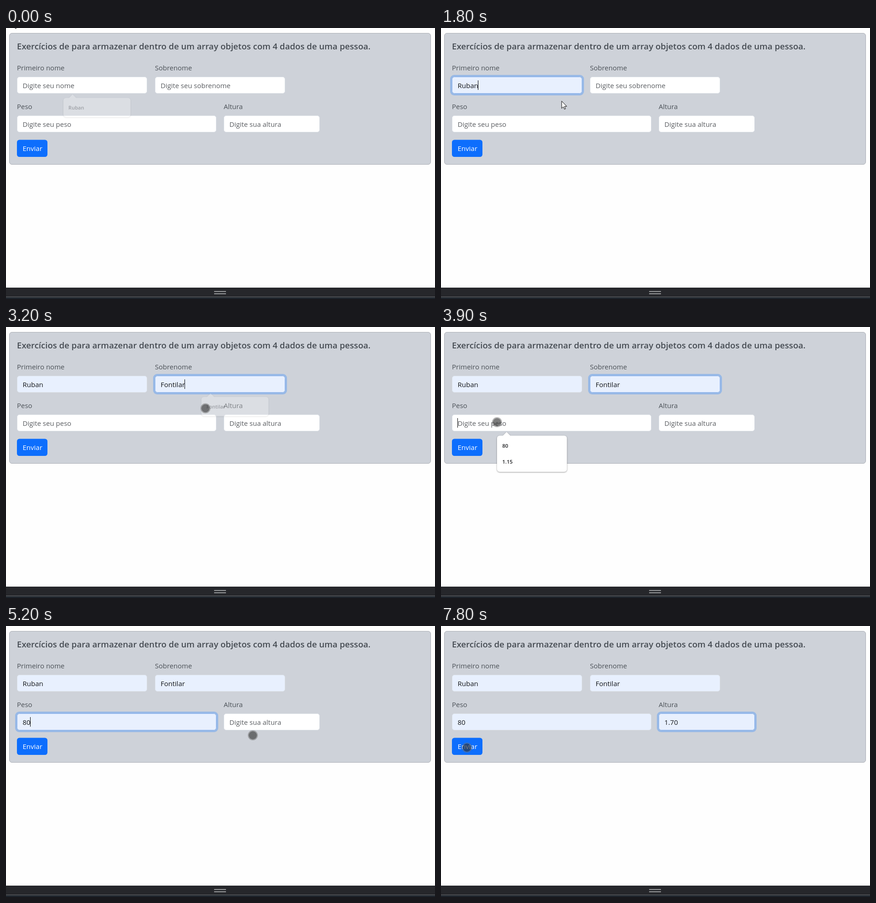
An HTML page for the animation above (8 s loop, 942 by 595 pixels).

```html
<!DOCTYPE html>
<html lang="pt-BR">
<head>
<meta charset="utf-8">
<title>Formulário</title>
<style>
html, body { margin: 0; height: 100%; overflow: hidden; background: #fefefe; }
svg { display: block; width: 942px; height: 595px; }
text { font: 15px "Open Sans", "Noto Sans", sans-serif; fill: #4b5157; white-space: pre; }
.title { font-size: 18.63px; font-weight: 600; fill: #454b52; }
.hint { fill: #5b5e62; }
.value { fill: #14171a; }
.preview { fill: #14171a; font-size: 12.6px; }
.button { fill: #fff; }
.item { fill: #202124; font-size: 11.5px; font-weight: 600; }
.popup { fill: #fff; filter: drop-shadow(0 1px 1.5px rgba(0, 0, 0, .4)); }
</style>
</head>
<body>
<svg viewBox="0 0 942 595">
  <rect x="7.5" y="11.5" width="925" height="288" rx="5.5" fill="#ced2d9" stroke="#a9adb4"/>
  <text class="title" x="24" y="47">Exercícios de para armazenar dentro de um array objetos com 4 dados de uma pessoa.</text>
  <rect x="24" y="245.5" width="67" height="37.5" rx="5.5" fill="#0d6efd"/>
  <text class="button" x="36.5" y="270">Enviar</text>
  <rect y="570" width="942" height="25" fill="#26272b"/>
  <path d="M457 578.5h26M457 583.5h26" stroke="#c4c5c7" stroke-width="1.6"/>
  <path d="M0 590.5h942" stroke="#707376"/>
  <rect y="591" width="942" height="4" fill="#20262d"/>
  <g id="live"></g>
</svg>
<script>
const LOOP = 8000, STEP = 100, FIELD_H = 37, MENU_W = 153.5, ROW_H = 35.5;
const live = document.getElementById('live');
const pen = document.createElement('canvas').getContext('2d');
pen.font = '15px "Open Sans", "Noto Sans", sans-serif';

// Times in ms. clicks: time and place; hovers: time and menu row; aim: pointer offset in a row
const fields = [
  { x: 24, y: 107, w: 286, label: 'Primeiro nome', hint: 'Digite seu nome', items: ['Ruban'], aim: [12, 3],
    clicks: [{ t: 800, x: 133, y: 140 }, { t: 1100, x: 133, y: 140 }],
    focus: 800, menu: 1000, hovers: [{ t: 1300, row: 0 }], done: 1600 },
  { x: 327, y: 107, w: 286, label: 'Sobrenome', hint: 'Digite seu sobrenome', items: ['Fontilar'], aim: [12, 3],
    clicks: [{ t: 2300, x: 432, y: 136 }],
    focus: 2300, menu: 2400, hovers: [{ t: 2800, row: 0 }], done: 3200 },
  { x: 24, y: 192, w: 438, label: 'Peso', hint: 'Digite seu peso', items: ['80', '1.15'], aim: [17, 3],
    clicks: [{ t: 3900, x: 123, y: 209 }],
    focus: 3900, menu: 3900, hovers: [{ t: 4300, row: 0 }], done: 4800 },
  { x: 478, y: 192, w: 211, label: 'Altura', hint: 'Digite sua altura', items: ['1.70', '165', '1.15'], aim: [17, -7],
    clicks: [{ t: 5200, x: 542, y: 240 }, { t: 5600, x: 552, y: 215 }],
    focus: 5600, menu: 5700, hovers: [{ t: 6000, row: 0 }, { t: 6300, row: 1 }, { t: 6600, row: 0 }], done: 7100 }
];
fields.forEach((f, i) => {
  f.blur = i + 1 < fields.length ? fields[i + 1].focus : Infinity;
  f.tipX = f.x + Math.min(f.w / 2, 120);
  f.menuX = Math.floor(f.tipX - 21);
  f.menuY = f.y + 46.5;
});

const clamp = v => Math.max(0, Math.min(1, v));
const within = (t, a, b) => t >= a && t < b;
const text = (cls, x, y, s) => `<text class="${cls}" x="${x}" y="${y}">${s}</text>`;
const rowMid = (f, row) => f.menuY + 22 + ROW_H * row;
const hovered = (f, t) => f.hovers.reduce((row, h) => t >= h.t ? h.row : row, -1);
const place = (f, t, row) => ({ t, x: f.menuX + f.aim[0], y: rowMid(f, row) + f.aim[1] });

const send = { t: 7800, x: 57, y: 267 };
const accepts = fields.map(f => place(f, f.done, hovered(f, f.done)));
const presses = [...fields.flatMap(f => f.clicks), ...accepts, send];
const stops = [{ t: 0, x: 14, y: -17 }, ...presses,
  ...fields.flatMap(f => f.hovers.map(h => place(f, h.t, h.row)))].sort((a, b) => a.t - b.t);

function drawField(f, t) {
  const { x, y, w } = f, row = hovered(f, t), done = t >= f.done, textX = x + 12.5;
  const glow = clamp((t - f.focus) / 150) * clamp(1 - (t - f.blur) / 150);
  const box = (fill, stroke, opacity) => `<rect x="${x + .5}" y="${y + .5}" width="${w - 1}" height="${FIELD_H - 1}"
    rx="5" fill="${fill}" stroke="${stroke}" opacity="${opacity}"/>`;
  let out = text('label', x, y - 14, f.label);
  out += `<rect x="${x - 4}" y="${y - 4}" width="${w + 8}" height="${FIELD_H + 8}" rx="9" fill="#98b9e6" opacity="${glow}"/>`;
  out += box(row < 0 ? '#fff' : '#e8f0fe', '#dbe0e6', 1) + box('none', '#8fb6ef', glow);
  if (row < 0) out += text('hint', textX, y + 25, f.hint);
  else if (done) out += text('value', textX, y + 25, f.items[row]);
  else out += text('preview', textX, y + 24.5, f.items[row]);

  const since = done ? f.done : f.focus;
  if (within(t, f.focus, f.blur) && (done || row < 0) && (t - since) % 1000 < 500) {
    const end = done ? pen.measureText(f.items[row]).width : 0;
    out += `<rect x="${Math.floor(textX + end)}" y="${y + 8}" width="1" height="21" fill="#000"/>`;
  }
  return out;
}

function drawPopup(f, t) {
  const fading = within(t, f.done, f.done + STEP) || (f === fields[0] && t < STEP);
  if (!fading && !within(t, f.menu, f.done)) return '';
  const x = f.menuX, y = f.menuY, h = 8.5 + ROW_H * f.items.length, mid = x + MENU_W / 2;
  const look = fading ? `opacity=".28" transform="translate(${mid} ${y}) scale(.96) translate(${-mid} ${-y})"` : '';
  let out = `<g ${look}><g class="popup"><rect x="${x}" y="${y}" width="${MENU_W}" height="${h}" rx="6"/>
    <path d="M${f.tipX - 8.5} ${y + .5}l8.5 -8.5 8.5 8.5z"/></g>`;
  const row = fading ? -1 : hovered(f, t);
  f.items.forEach((s, i) => {
    out += text('item', x + 11.5, rowMid(f, i) + 4.3, s);
    if (i === row) out += `<path d="M${x + 128.5} ${rowMid(f, i) - 4.5}l9 9m0 -9l-9 9" stroke="#45484c" stroke-width="1.7"/>`;
  });
  return out + '</g>';
}

function drawPointer(t) {
  const a = stops.filter(s => s.t <= t).pop();
  const b = stops.find(s => s.t > t) || { ...a, t: LOOP };
  // the hand arrives early and rests until the next action
  const k = clamp(1.6 * (t - a.t) / (b.t - a.t)), e = k * k * (3 - 2 * k);
  const x = a.x + (b.x - a.x) * e, y = a.y + (b.y - a.y) * e;
  if (presses.some(p => within(t, p.t, p.t + STEP)) || t >= send.t)
    return `<circle cx="${x}" cy="${y}" r="9" fill="#323232" fill-opacity=".64"/>
      <circle cx="${x}" cy="${y}" r="10" fill="none" stroke="#6e6e6e" stroke-opacity=".5" stroke-width="2"/>`;
  return `<path transform="translate(${x} ${y})" d="M.5 .5V16.5L4.2 13 6.6 18.4 9 17.4 6.7 12.1H11.8Z" fill="#fff" stroke="#000"/>`;
}

let last = -1;
function tick(now) {
  const t = Math.floor(now % LOOP / STEP) * STEP;
  if (t !== last) {
    last = t;
    live.innerHTML = fields.map(f => drawField(f, t)).join('') +
      fields.map(f => drawPopup(f, t)).join('') + drawPointer(t);
  }
  requestAnimationFrame(tick);
}
tick(performance.now());
</script>
</body>
</html>
```
